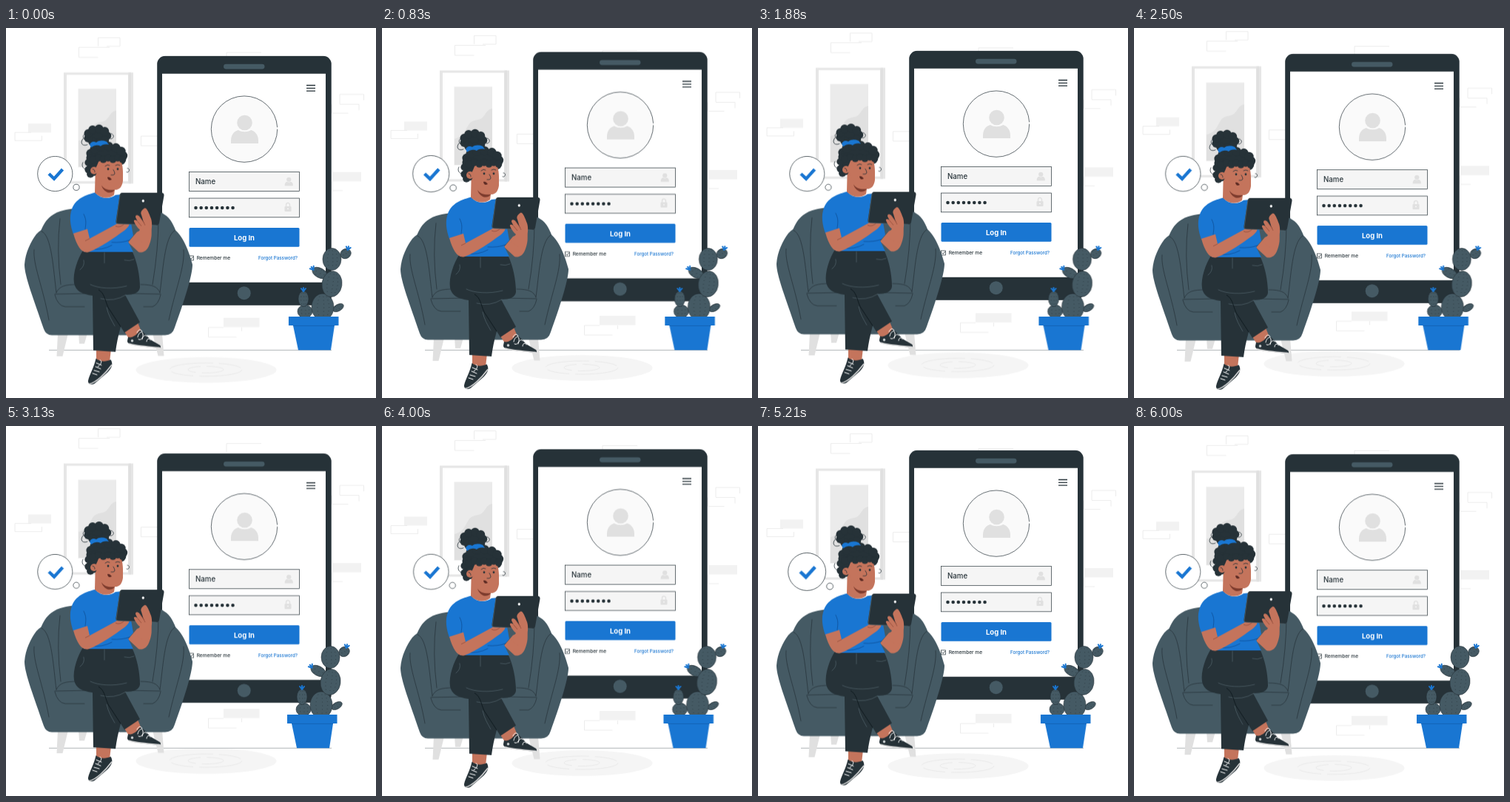
An HTML page that plays this animation: 500 by 500 pixels, repeating every 6.04 s.

```html
<!DOCTYPE html>
<html lang="en">
<head>
<meta charset="utf-8">
<title>Log in</title>
<style>
  html, body { margin: 0; width: 100%; height: 100%; overflow: hidden; background: #fff; }
  svg { display: block; width: 100vw; height: 100vh; }
  text { font-family: Inter, "Open Sans", sans-serif; font-weight: 500; fill: #263238; }

  .room { animation: rise 3020ms linear -40ms infinite alternate; }
  .tablet { animation: rise 1510ms linear -40ms infinite alternate; }
  .sitter { animation: bob 1510ms cubic-bezier(.37, 0, .63, 1) -1278ms infinite; }
  .bubble { transform-origin: 69px 198px; animation: beat 1510ms linear -40ms infinite; }
  .plant { animation: shake 6040ms linear -40ms infinite; }

  @keyframes rise {
    from { transform: translateY(-.3px); }
    to { transform: translateY(-10.3px); }
  }
  @keyframes bob {
    0%, 100% { transform: translateY(-2.3px); }
    50% { transform: translateY(6.7px); }
  }
  @keyframes beat {
    0%, 28%, 70%, 100% { transform: scale(1); }
    42% { transform: scale(1.1); }
  }
  @keyframes shake {
    0%, 100% { transform: none; }
    10%, 90% { transform: translateX(-1px); }
    20%, 80% { transform: translateX(2px); }
    30%, 50%, 70% { transform: translateX(-4px); }
    40%, 60% { transform: translateX(4px); }
  }

  .dark { fill: #263238; }
  .slate { fill: #455a64; }
  .blue { fill: #1976d2; }
  .skin { fill: #c4745c; }
  .grey { fill: #e0e0e0; }
  .line { fill: none; stroke: #263238; stroke-width: .8; stroke-linecap: round; stroke-linejoin: round; }
  .soft { fill: none; stroke: #5b6d76; stroke-width: .6; stroke-linecap: round; }
  .crease { fill: none; stroke: #8d4838; stroke-width: .7; }
  .lace { fill: none; stroke: #fff; stroke-width: 1; stroke-linecap: round; }
  .brick { fill: #f2f2f2; }
  .edge { fill: none; stroke: #e8e8e8; stroke-width: .8; }
  .field { fill: #f5f5f5; stroke: #263238; stroke-width: .7; }
</style>
</head>
<body>
<svg viewBox="0 0 500 500">
  <g class="room">
    <!-- bricks -->
    <path class="brick" d="M30 129.5h31v12h-31zM441 195h39v12.500h-39zM294 392h48.500v12.500h-48.500z"/>
    <path class="edge" d="M124.500 25v-11.500h29.500v11.500h-18M140 26.500H98.500v13.500h26M48.500 146v6.500H12v-11h22
      M451 103V90h32.500v8M451 103.500h26v8M440.500 103.500v12h22M441 208v12h14
      M298 45V33.500h47M206 146.500h-23.500v13h22M294 405h-20.500v13h38M318.500 405v5"/>
    <!-- picture -->
    <path fill="#e6e6e6" d="M78 60.500h94v150H78z"/>
    <path fill="#fff" d="M82 63.500h83v144H82z"/>
    <path class="grey" d="M165.500 60.500h3.500v150h-3.500z"/>
    <path fill="#ebebeb" d="M97.500 82.500h51.500v106H97.500z"/>
    <path class="grey" d="M149 112c-8 1-9 9-14 13-6 4-13 1-18 9-5 7-5 15-19 19v35h51z"/>
    <!-- rug -->
    <ellipse cx="270.500" cy="462.500" rx="95" ry="17.300" fill="#f5f5f5"/>
    <g class="edge">
      <ellipse cx="270" cy="462" rx="49" ry="9" stroke-dasharray="60 8 30 5"/>
      <ellipse cx="270" cy="462" rx="24" ry="4.500" stroke-dasharray="30 8"/>
    </g>
  </g>

  <path d="M58 435.300H440" stroke="#a9adb0" stroke-width=".9"/>

  <g class="tablet">
    <rect class="dark" x="204.200" y="38.300" width="235.500" height="337" rx="11"/>
    <rect class="slate" x="294" y="49.200" width="55.500" height="6.800" rx="3.400"/>
    <path fill="#fff" d="M211 62.300h221v282H211z"/>
    <circle class="slate" cx="321.700" cy="358.700" r="9"/>
    <path d="M406 78.100h12M406 81.900h12M406 85.700h12" stroke="#263238" stroke-width="1.400"/>

    <circle cx="322" cy="137.200" r="44.700" fill="#fafafa" stroke="#263238" stroke-width=".7"
      stroke-dasharray="278 3"/>
    <g id="user" class="grey">
      <circle cx="322.500" cy="128.500" r="10.300"/>
      <path d="M304 156.500v-4c0-9 6-13.500 10-14 5 3 12 3 17 0 5 1 10 6 10 14v4z"/>
    </g>

    <rect class="field" x="247.500" y="195.200" width="149" height="26"/>
    <text x="256" y="211.500" font-size="9.700">Name</text>
    <use href="#user" transform="translate(285.500 166.800) scale(.3)"/>

    <rect class="field" x="247.500" y="230.600" width="149" height="25.800"/>
    <g id="dots" class="dark"></g>
    <rect class="grey" x="376.500" y="241.500" width="9" height="7" rx="1"/>
    <path d="M378.500 241.500v-2a2.500 2.500 0 0 1 5 0v2" fill="none" stroke="#e0e0e0" stroke-width="1.300"/>
    <circle cx="381" cy="244.800" r="1" fill="#f5f5f5"/>

    <rect class="blue" x="247.500" y="270.500" width="149" height="25.800" rx="1.500"/>
    <text x="322" y="287.200" font-size="9.500" text-anchor="middle" style="font-weight:700;fill:#fff">Log In</text>

    <rect x="247.400" y="308.500" width="6" height="6" fill="#fff" stroke="#263238" stroke-width=".7"/>
    <path class="line" d="M248.800 311.500l1.400 1.500 2.300-3"/>
    <text x="257.700" y="314" font-size="6.550">Remember me</text>
    <text x="341" y="314" font-size="6.200" style="fill:#1976d2">Forgot Password?</text>
  </g>

  <g class="sitter">
    <!-- armchair -->
    <path class="grey" d="M70 413h14l-7.500 31H68.500zM198 413h13l2.500 30.500h-8zM98 413h12l-4 14h-7z"/>
    <path class="slate" d="M46 277C54 256 64 248 90 244.500Q145 239.500 198 246.500C218 250 224 260 230 276L210 400H62Z"/>
    <path class="slate" d="M25 320C26 304 34 288 41 279Q46 273 54 271C62 298 64 330 68 358H208C212 330 214 298 223 270
      C236 275 246 297 252 320C252 335 240 372 228 405Q225 415.500 215 415.500H62Q54 415.500 51 407
      C38 368 25 336 25 320Z"/>
    <path class="line" style="stroke-width:.7" d="M48 275C62 280 64 328 68 358M228 274C214 282 212 330 208 358
      M68 358C72 349 80 347 96 347M182 347C198 347 205 350 208 358M66 360Q140 358 209 360
      M66 361Q70 376 80 377H106M186 377H198Q206 374 209 361M73 258Q68 300 74 347M206 257Q206 300 198 347
      M38 300C36 320 50 350 58 395M240 300C242 322 230 350 220 395"/>

    <!-- standing leg -->
    <path class="skin" d="M122 434h20l-2 18-18 2z"/>
    <path class="dark" d="M121.500 447c5 4 13 5 20 1.500 4 6 1 12-4 17l-18 15.500c-4 2-9 1-8.500-4 2-9 8-18 10.500-30z"/>
    <path d="M112 481.500c9-1 23-15 31-26" fill="none" stroke="#e0e0e0" stroke-width="1.500"/>
    <path class="lace" d="M122 453l7 3M121 458l7 3M119 463l7 2M117 467l6 2M127 449c4 1 1 7-3 9"/>

    <!-- crossed foot -->
    <path class="skin" d="M157 406l20-10 6 15-15 12z"/>
    <path class="dark" d="M165 418c5 2 12-3 16-9 6 2 10 9 15 13l12 7c2 2 1 4-2 4l-26-3c-7-1-17-2-16-7z"/>
    <path d="M166 427c9 3 26 4 42 5.500" fill="none" stroke="#e0e0e0" stroke-width="1.500"/>
    <circle cx="170.500" cy="423" r="1.800" fill="#cfd4d6"/>
    <path class="lace" d="M178 418c1-6 6-9 7-4s-3 9-6 7M184 421c1-5 5-7 6-4M190 424c0-4 4-5 5-2M177 412c2-5 6-5 7-1"/>

    <!-- trousers -->
    <path class="dark" d="M104 301h66c7 14 11 34 11 50-1 7-8 10-20 10l20 37-21 14-5-8q-5 18-7 34l-30-2-1-74
      c-14-2-23-6-25-17-2-14 5-33 12-44z"/>
    <path class="soft" d="M128 366q18 5 34-5M136 378c2 10 7 18 11 25M105 314q2 8-5 13M160 314q7 2 13-1M114 347c10 5 30 7 49 2M133 304v14"/>
    <path fill="none" stroke="#111c21" stroke-width="1" d="M125 354c8 5 8 12 13 24l17 26"/>

    <!-- far arm and torso -->
    <path class="skin" d="M165 290l12-14 18-8c3 8 2 18-2 27-3 7-9 10-14 8z"/>
    <path class="blue" d="M120 222c8 10 20 10 28 4l10-1 8 22 6 34-7 8 7 14h-67l3-25-17 1c-4-11-6-24-2-34 5-14 18-19 34-23z"/>
    <path class="line" style="stroke:#0f5098" d="M107 272c1-8 2-12-2-20M116 299q14 2 27-5M143 290q14 1 24-3"/>

    <!-- head -->
    <path class="skin" d="M121 182h35l1 24c0 8-4 12-10 13l-1 7q-13 9-26-3z"/>
    <path fill="#7c3b2d" d="M129 213c4 6 11 7 18 6-5 7-15 4-18-6z"/>
    <g id="hair" class="dark"></g>
    <path class="skin" d="M121 190c3-5 4-10 6-13 8-4 22-4 27 0 5 9 4 20 4 30-1 7-4 12-10 12-12 0-20-8-23-19z"/>
    <g id="fringe" class="dark"></g>
    <circle class="skin" cx="119" cy="193" r="5"/>
    <path class="line" d="M117 191q3 0 3 4M134 187q3-3 6-1M148 186q3-2 6 0M145 192q4 6 0 7h-3"/>
    <circle class="dark" cx="138" cy="191" r="1.400"/>
    <circle class="dark" cx="151" cy="191" r="1.400"/>
    <path fill="#5d2b24" d="M137 202q3-1 6 3-5 3-6-3z"/>
    <path class="blue" d="M113 158c2-4 5-5 9-3 4-3 9-3 14-1l3 4c-6-1-9 0-11 2-4-2-8-2-13 2z"/>
    <path class="line" d="M104 150c-5 6 0 11 6 8M142 143c6 2 3 8-1 7M104 182c-3 5 1 9 4 9M164 190c5 0 2 7-1 5M107 143c-3 2-4 5-1 8"/>

    <!-- near arm, tablet, hands -->
    <path class="skin" d="M91 278l19-6 3 13 35-19c6-4 12-6 17-4 4 3 0 8-5 12-14 10-32 23-48 29-9 3-16-7-21-25z"/>
    <path class="crease" d="M113 285l-6 3M148 268q6 3 12-3"/>
    <path class="dark" d="M157 223h53q4 0 3.500 4l-6.500 37q-1 3-4 3l-52-2q-3 0-2.500-4l5-34q.5-4 3.500-4z"/>
    <path class="soft" d="M154 226l-5 37q0 2 3 2l51 2"/>
    <circle cx="185.300" cy="234" r="1.700" fill="#fff"/>
    <path class="skin" d="M187 244c3-2 6 6 9 14 2 6 1 13 0 20l-4 12c-6 2-15-2-17-8l6-9c-3-2-6-7-8-11-1-3 3-3 5 0
      l-3-6c0-4 4-3 6 0l5 7-3-10c-2-4 1-7 4-9z"/>
    <path class="crease" d="M178 262l5 6M181 256l6 8M186 263l2 4"/>
  </g>

  <g class="bubble" fill="#fff" stroke="#263238" stroke-width=".7">
    <circle cx="66.300" cy="197" r="23.600"/>
    <circle cx="95" cy="215.300" r="4.100"/>
    <path d="M58 197l7 6.700L76.500 191" fill="none" stroke="#1976d2" stroke-width="4.300"/>
  </g>

  <g class="plant">
    <g id="cactus" class="slate" stroke="#263238" stroke-width=".6"></g>
    <g id="flowers" fill="none" stroke="#1976d2" stroke-width="2" stroke-linecap="round"></g>
    <path class="blue" d="M382 390h67.500v12H382zM388 402h56l-5 33.300h-44z"/>
    <path d="M388 402.400h56" stroke="#1260b0" stroke-width=".8"/>
  </g>
</svg>
<script>
  const NS = "http://www.w3.org/2000/svg";
  const add = (id, tag, attrs) => {
    const el = document.createElementNS(NS, tag);
    for (const key in attrs) el.setAttribute(key, attrs[key]);
    document.getElementById(id).append(el);
  };

  for (let i = 0; i < 8; i++)
    add("dots", "circle", { cx: 256.500 + i * 7.150, cy: 243.500, r: 2.300 });

  // rings of curls: centre, radii, curl size, count
  const curls = (cx, cy, rx, ry, r, n) => {
    add("hair", "ellipse", { cx, cy, rx, ry });
    for (let i = 0; i < n; i++) {
      const a = i / n * 2 * Math.PI;
      add("hair", "circle", { cx: cx + rx * Math.cos(a), cy: cy + ry * Math.sin(a), r });
    }
  };
  curls(123.500, 146, 13, 9.500, 5.800, 9);
  curls(136, 173, 22, 13, 6.200, 13);
  curls(115, 187, 4, 11, 5, 7);

  for (let i = 0; i < 6; i++)
    add("fringe", "circle", { cx: 125 + i * 6.500, cy: 176 + i % 2 * 2, r: 4.800 });

  // cactus pads: centre, radii, tilt
  const pads = [
    [404, 383, 10, 9, 0], [402, 366, 7, 10.500, 0], [449, 378, 8, 4.500, -30],
    [428, 377, 15, 18, 0], [424, 331, 11, 6.500, 28], [440.500, 346, 13.500, 17.500, 8],
    [459, 305, 7.500, 6.500, -30], [440.500, 312.500, 12.500, 15, 0]
  ];
  for (const [cx, cy, rx, ry, tilt] of pads) {
    const transform = `rotate(${tilt} ${cx} ${cy})`;
    add("cactus", "ellipse", { cx, cy, rx, ry, transform });
    for (const k of [-.45, .1, .55])
      add("cactus", "path", {
        d: `M${cx + k * rx * .6} ${cy - ry * .8}Q${cx + k * rx * 1.5} ${cy} ${cx + k * rx * .6} ${cy + ry * .8}`,
        fill: "none", "stroke-dasharray": "1 4", transform
      });
  }

  for (const [x, y, tilt] of [[462, 299, 15], [415, 326, -35], [402, 355, 0]])
    add("flowers", "path", { d: "M0 1l-3-4M0 1v-5M0 1l3-4", transform: `translate(${x} ${y}) rotate(${tilt})` });
</script>
</body>
</html>
```
